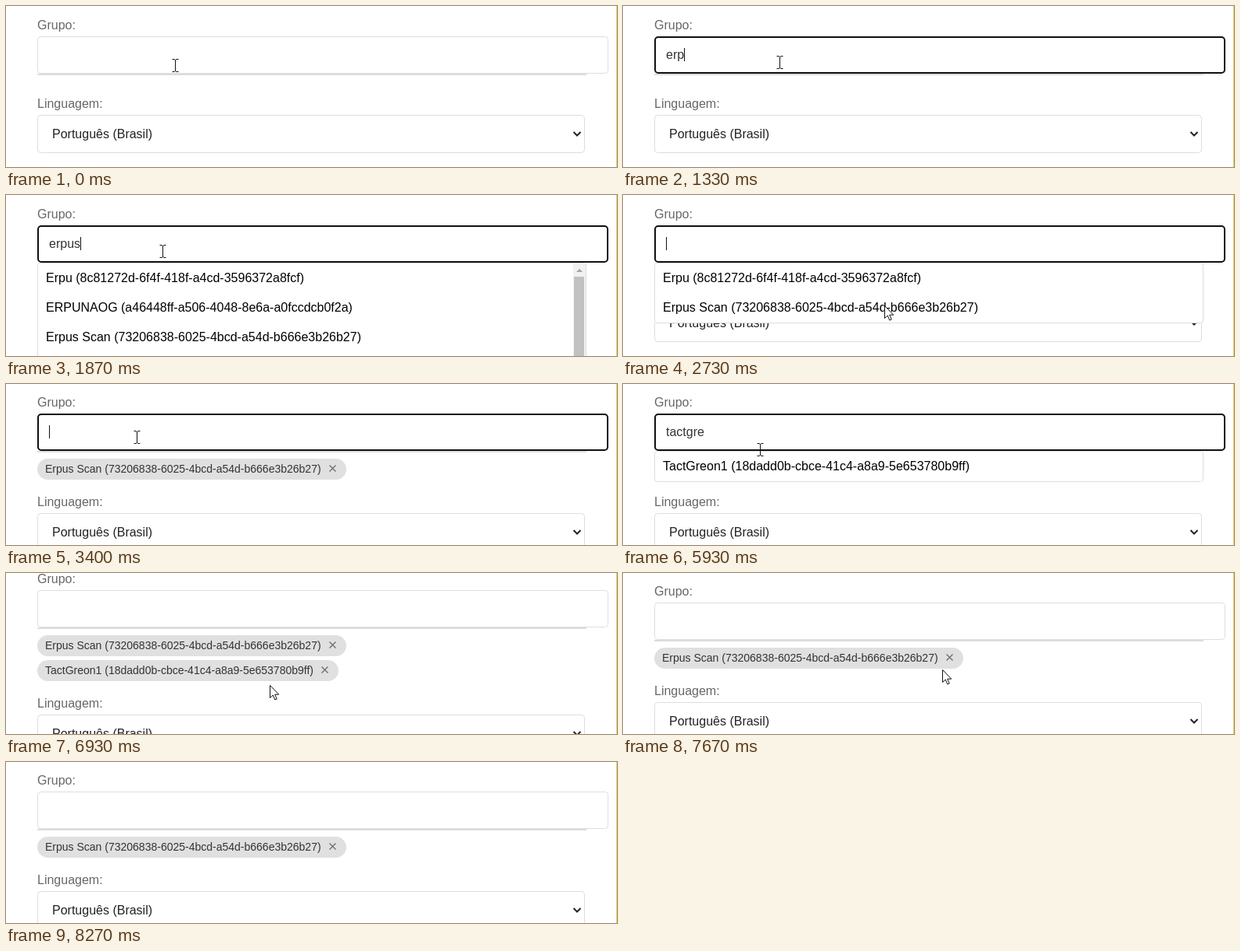
Animation of 781 by 207 pixels, one loop 8.74 s. Source, as an HTML page:

```html
<!DOCTYPE html>
<html lang="pt-BR">
<head>
<meta charset="utf-8">
<title>Grupo</title>
<style>
html, body { margin: 0; width: 100%; height: 100%; overflow: hidden; background: #fff; }
svg { display: block; }
text { font: 16px "Liberation Sans", Arial, sans-serif; white-space: pre; }
.label { fill: #666; }
.field { fill: #fff; stroke: #ddd; }
.chip text { font-size: 14px; fill: #333; }
.chip rect { fill: #e0e0e0; }
.chip path { stroke: #6c6c6c; stroke-width: 1.3; fill: none; }
</style>
</head>
<body>
<svg id="stage" width="781" height="207" viewBox="0 0 781 207">
  <rect width="781" height="207" fill="#fff"/>
  <g id="page">
    <text class="label" x="40" y="30">Grupo:</text>
    <rect x="40" y="87" width="702" height="2" fill="#dcdcdc"/>
    <g id="chips"></g>
    <g id="language">
      <text class="label" x="40" y="131">Linguagem:</text>
      <rect class="field" x="40.5" y="140.5" width="699" height="48" rx="4"/>
      <text x="59" y="170" fill="#222">Português (Brasil)</text>
      <path d="M725.5 162l4.5 4.5 4.5-4.5" fill="none" stroke="#222" stroke-width="2"/>
    </g>
    <g id="menu"></g>
    <rect id="input" x="40.5" y="39.5" width="729" height="47" rx="4" fill="#fff"/>
    <text id="typed" x="55" y="68" fill="#333"></text>
    <rect id="caret" y="54" width="1" height="17" fill="#111"/>
  </g>
  <rect x="780" width="1" height="207" fill="#dfcd55"/>
  <g id="pointer">
    <path id="beam" d="M-3.5-7.5h2.5l1.5 1 1.5-1h2.5M.5-6.5v14M-3.5 8.5h2.5l1.5-1 1.5 1h2.5" fill="none" stroke="#111"/>
    <path id="arrow" d="M.5.5v16l3.7-3.5 2.6 6 2.4-1-2.5-5.8h5z" fill="#fff" stroke="#111"/>
    <path id="hand" d="M-1.5 12V1.5q0-1.5 1.5-1.5t1.5 1.5V7q1-1 2.5 0 1.5-.6 2.5.6 2.5-.4 3 1.4v5.500l-2 3.500v2h-8v-2l-5-6.500q-1-2 1-2.200z" fill="#fff" stroke="#111"/>
  </g>
</svg>
<script>
const LOOP = 8740, TICK = 200 / 3, BLINK = 515;
const $ = id => document.getElementById(id);

const scan = "Erpus Scan (73206838-6025-4bcd-a54d-b666e3b26b27)";
const greon = "TactGreon1 (18dadd0b-cbce-41c4-a8a9-5e653780b9ff)";
const erpu = "Erpu (8c81272d-6f4f-418f-a4cd-3596372a8fcf)";

// thumb: length of the scrollbar handle, 0 for none
const menus = {
  none: { rows: [] },
  first: { rows: [erpu] },
  erpu: { rows: [erpu, "ERPUNAOG (a46448ff-a506-4048-8e6a-a0fccdcb0f2a)", scan], thumb: 140 },
  erpus: { rows: [erpu, scan] },
  tact: {
    rows: [
      "Tact Modu Scanlations (34d0758a-3c68-4419-b4c0-03606abe276f)",
      "Hipo Tactament (4c2de5c9-8caa-42d1-8312-03df0a50f597)",
      "Frisofu's tact scans (6410209a-0f39-4f51-a139-bc559ad61a4f)"
    ],
    thumb: 46
  },
  greon: { rows: [greon] },
  hover: { rows: [greon], color: "#495057", back: "#f8f9fa" }
};
const chipList = [[scan, 395], [greon, 385]];

// time, menu, focused, chips, scroll
const views = [
  [0, "none", 0, 0, 0],
  [200, "none", 1, 0, 0],
  [1730, "first", 1, 0, 0],
  [1870, "erpu", 1, 0, 0],
  [2000, "erpus", 1, 0, 0],
  [2870, "none", 0, 0, 0],
  [2930, "none", 0, 1, 1],
  [3400, "none", 1, 1, 1],
  [4670, "tact", 1, 1, 1],
  [5000, "greon", 1, 1, 1],
  [6000, "hover", 1, 1, 1],
  [6270, "none", 0, 2, 1],
  [6400, "none", 0, 2, 17],
  [7670, "none", 0, 1, 1]
];

const keys = [[0, ""], [270, ""]];
function type(word, times) {
  times.forEach((t, i) => keys.push([t, word.slice(0, i + 1)]));
}
type("erpus", [800, 1130, 1330, 1470, 1670]);
keys.push([2730, ""], [3400, ""]);
type("tactgre", [4070, 4130, 4270, 4400, 4600, 4800, 5000]);
keys.push([6130, ""]);

// time, x, y
const path = [
  [0, 216, 76], [200, 200, 72], [2200, 200, 72], [2400, 245, 95], [2670, 334, 142],
  [2870, 334, 142], [2930, 334, 137], [3000, 334, 137], [3270, 167, 68], [5700, 167, 68],
  [5730, 168, 68], [5800, 168, 68], [5930, 175, 83], [6070, 180, 98], [6200, 180, 98],
  [6400, 180, 87], [6600, 180, 87], [6930, 335, 144], [7130, 388, 143], [7330, 408, 124],
  [7800, 408, 124], [8200, 75, 196], [8270, 58, 216]
];

const last = (list, t) => list.filter(e => e[0] <= t).pop();

function locate(t) {
  const a = last(path, t), b = path[path.indexOf(a) + 1];
  if (!b) return [a[1], a[2]];
  const k = (t - a[0]) / (b[0] - a[0]);
  return [1, 2].map(i => Math.round(a[i] + (b[i] - a[i]) * k));
}

function menuMarkup({ rows, thumb = 0, color = "#000", back = "#fff" }) {
  if (!rows.length) return "";
  const h = rows.length * 38 + (thumb ? 80 : 1);
  let out = `<rect x="40" y="87" width="702" height="${h + 1}" fill="#fff"/>
    <rect x="40.5" y="87.5" width="701" height="${h}" rx="3" fill="${back}" stroke="#ddd"/>`;
  rows.forEach((row, i) => out += `<text x="51" y="${112 + 38 * i}" fill="${color}">${row}</text>`);
  if (thumb) out += `<rect x="725" y="88" width="16" height="140" fill="#f1f1f1"/>
    <path d="M729 99l4-4 4 4z" fill="#a3a3a3"/>
    <rect x="726" y="105" width="13" height="${thumb}" fill="#c1c1c1"/>`;
  return out;
}

function chipMarkup([name, w], i) {
  return `<g class="chip" transform="translate(40 ${97 + 32 * i})">
    <rect width="${w}" height="27" rx="13.5"/><text x="10" y="18">${name}</text>
    <path d="M${w - 21.5} 8.500l8 8m0-8l-8 8"/></g>`;
}

const show = (id, on) => $(id).setAttribute("visibility", on ? "visible" : "hidden");
const move = (id, x, y) => $(id).setAttribute("transform", `translate(${x} ${y})`);

function pointerKind(t, y, top) {
  if (t >= 7330 && t < 7670) return "hand";
  return y > top && y < top + 47 ? "beam" : "arrow";
}

let drawnMenu, drawnChips;
function draw(time) {
  const t = Math.floor((time + 4) / TICK) * TICK + 4;
  const [, menu, focus, chips, scroll] = last(views, t);
  const [keyTime, word] = last(keys, t);

  move("page", 0, -scroll);
  move("language", 0, chips ? 32 * chips - 5 : 0);
  if (menu !== drawnMenu) $("menu").innerHTML = menuMarkup(menus[drawnMenu = menu]);
  if (chips !== drawnChips) {
    drawnChips = chips;
    $("chips").innerHTML = chipList.slice(0, chips).map(chipMarkup).join("");
  }

  const input = $("input"), inset = focus ? 1 : 0.5;
  input.setAttribute("x", 40 + inset);
  input.setAttribute("y", 39 + inset);
  input.setAttribute("width", 730 - 2 * inset);
  input.setAttribute("height", 48 - 2 * inset);
  input.setAttribute("stroke", focus ? "#101010" : "#ddd");
  input.setAttribute("stroke-width", 2 * inset);

  $("typed").textContent = word;
  const width = word ? $("typed").getComputedTextLength() : 0;
  $("caret").setAttribute("x", 55 + Math.round(width));
  show("caret", focus && t >= 270 && (t - keyTime) % (2 * BLINK) < BLINK);

  const [x, y] = locate(t), kind = pointerKind(t, y, 39 - scroll);
  move("pointer", x, y);
  for (const id of ["beam", "arrow", "hand"]) show(id, id === kind);
}

const start = performance.now();
function frame() {
  draw((performance.now() - start) % LOOP);
  requestAnimationFrame(frame);
}
frame();
</script>
</body>
</html>
```
